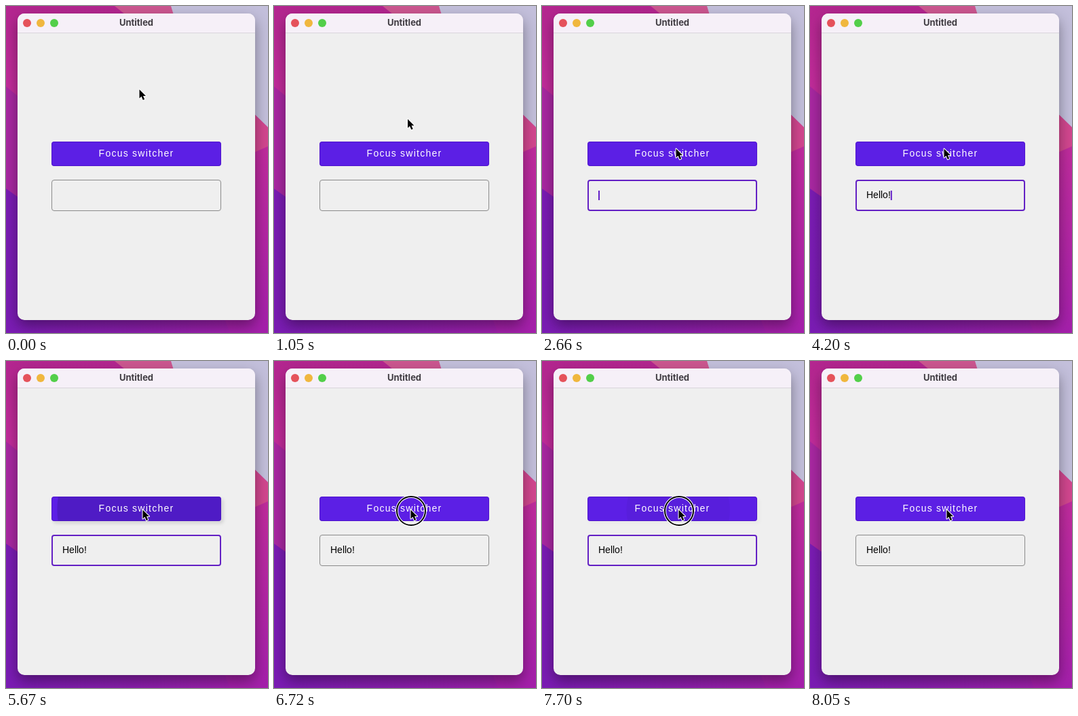
Write an HTML page that moves like this. It is 386x480 px and loops after 8.19 s.

```html
<!DOCTYPE html>
<html lang="en">
<head>
<meta charset="utf-8">
<title>Focus switcher</title>
<style>
  html, body { margin: 0; width: 100%; height: 100%; overflow: hidden; }
  svg { display: block; width: 386px; height: 480px; }
  text { font: 14px "Liberation Sans", Arial, sans-serif; white-space: pre; }
  #win { filter: drop-shadow(0 9px 10px rgba(0, 0, 0, .38)); }
</style>
</head>
<body>
<svg viewBox="0 0 386 480">
  <defs>
    <linearGradient id="left" x2="0" y2="1">
      <stop stop-color="#b3268f"/><stop offset=".25" stop-color="#c22c9b"/>
      <stop offset="1" stop-color="#9a22a8"/>
    </linearGradient>
    <linearGradient id="violet" x2="1" y2="0">
      <stop stop-color="#7a1cb4"/><stop offset=".5" stop-color="#8d1fae"/>
      <stop offset="1" stop-color="#a721ac"/>
    </linearGradient>
    <linearGradient id="right" x2="0" y2="1">
      <stop stop-color="#c62f99"/><stop offset="1" stop-color="#a420ab"/>
    </linearGradient>
    <clipPath id="face"><rect x="67" y="199" width="250" height="36" rx="4"/></clipPath>
    <filter id="soft" x="-10%" y="-50%" width="120%" height="200%"><feGaussianBlur stdDeviation="2"/></filter>
  </defs>

  <!-- wallpaper -->
  <rect width="386" height="480" fill="url(#left)"/>
  <path d="M0 268L386 400V480H0Z" fill="url(#violet)"/>
  <path d="M0 118L17 132V280L0 268Z" fill="#a928a2"/>
  <path d="M200 140H386V480H330Z" fill="url(#right)"/>
  <path d="M160 0H260V40H210Z" fill="#cc5790"/>
  <path d="M340 134L386 178V206L340 226Z" fill="#d2478f"/>
  <path d="M243 0H386V178L260 56Z" fill="#c3bfdb"/>

  <!-- window -->
  <g id="win">
    <rect x="17" y="11" width="350" height="450" rx="10" fill="#efefef"/>
    <path d="M17 40V21a10 10 0 0 1 10-10H357a10 10 0 0 1 10 10V40Z" fill="#f6f0f8"/>
  </g>
  <path d="M17 39.5H367" stroke="#dad5dc"/>
  <circle cx="31" cy="25" r="6" fill="#e5525b"/>
  <circle cx="51" cy="25" r="6" fill="#f0b73e"/>
  <circle cx="71" cy="25" r="6" fill="#53cf4a"/>
  <text x="192" y="29" text-anchor="middle" fill="#3f3b41"
        style="font: 700 13px Inter, sans-serif">Untitled</text>

  <!-- button -->
  <rect id="shade" x="69" y="202" width="252" height="37" rx="5" filter="url(#soft)"/>
  <g clip-path="url(#face)">
    <rect x="67" y="199" width="250" height="36" fill="#5c1fe5"/>
    <circle id="ripple"/>
  </g>
  <rect x="67.5" y="199.5" width="249" height="35" rx="3.5" fill="none" stroke="#4a12c4" stroke-opacity=".7"/>
  <text x="136.6" y="221" fill="#fff" letter-spacing="1.25">Focus switcher</text>

  <!-- text field -->
  <rect id="field" fill="none"/>
  <text id="typed" x="83" y="282"></text>
  <rect id="caret" y="271" width="2" height="14" fill="#6320c8"/>

  <g id="pointer">
    <g id="ring" fill="none">
      <circle cx=".5" cy="1.5" r="21" stroke="#fff" stroke-width="4"/>
      <circle cx=".5" cy="1.5" r="21" stroke="#000" stroke-width="2"/>
    </g>
    <path d="M0 0V13L3 10.3L5.3 15.6L7.7 14.6L5.5 9.5H9.5Z" stroke="#fff" stroke-width="2"
          stroke-linejoin="round" paint-order="stroke"/>
  </g>
</svg>
<script>
const LOOP = 8190, STEP = 70;
const $ = id => document.getElementById(id);
const set = (id, attrs) => {
  for (const k in attrs) $(id).setAttribute(k, attrs[k]);
};
const clamp = x => Math.min(1, Math.max(0, x));
const mix = (a, b, k) => a + (b - a) * k;
const smooth = x => x * x * (3 - 2 * x);
const show = (id, on) => set(id, { visibility: on ? "visible" : "hidden" });

// cubic-bezier(.4, 0, .2, 1)
function fastOutSlowIn(x) {
  let lo = 0, hi = 1, u = .5;
  for (let i = 0; i < 20; i++) {
    u = (lo + hi) / 2;
    const v = 1 - u;
    if (1.2 * v * v * u + .6 * v * u * u + u * u * u < x) lo = u; else hi = u;
  }
  return u * u * (3 - 2 * u);
}

// press time and delay until the ripple starts
const clicks = [[1470, 65], [5530, 30], [6720, 50], [7630, 50]];
const keys = [2800, 2870, 3080, 3220, 3290, 3360];
const caretOn = [[1680, 2100], [2590, 3710], [4200, 4690], [5180, 5670], [6930, 7350]];
const advance = [0, 10.1, 17.9, 21, 24.1, 31.9, 35.8];

function pointerAt(t) {
  const a = smooth(clamp((t - 840) / 420)), b = smooth(clamp((t - 4550) / 350));
  return [196.5 + a + 4 * b, 122.5 + 87 * a + 9 * b];
}

function drawRipple(t, start, [px, py]) {
  const age = t - start, k = clamp(age / 225);
  const alpha = clamp(age / 75) * clamp((375 - age) / 150);
  set("ripple", {
    cx: mix(px, 192, k), cy: mix(py, 217, k),
    r: mix(75, 136, fastOutSlowIn(k)),
    "fill-opacity": .14 * alpha
  });
}

function drawField(focus) {
  const w = mix(1, 2, focus), rgb = [[139, 99], [139, 32], [139, 196]].map(([a, b]) => Math.round(mix(a, b, focus)));
  set("field", {
    x: 67 + w / 2, y: 255 + w / 2, width: 250 - w, height: 46 - w, rx: 4 - w / 2,
    stroke: `rgb(${rgb})`, "stroke-width": w
  });
}

function draw(t) {
  const [x, y] = pointerAt(t);
  set("pointer", { transform: `translate(${x} ${y})` });

  const [press, delay] = clicks.filter(c => c[0] <= t).pop() || [-1e4, 0];
  const since = t - press;
  show("ring", since < 140);
  drawRipple(t, press + delay, [x, y]);
  const lift = clamp((since - 50) / 80) * clamp((340 - since) / 140);
  set("shade", { "fill-opacity": .1 * lift });

  // each click toggles the focus
  drawField(clicks.reduce((f, c, i) => f + (i % 2 ? -1 : 1) * clamp((t - c[0] - 180) / 150), 0));

  const n = keys.filter(k => k <= t).length;
  $("typed").textContent = "Hello!".slice(0, n);
  set("caret", { x: 83 + advance[n] });
  show("caret", caretOn.some(([a, b]) => t >= a && t < b));
}

const begin = performance.now();
function tick() {
  const t = (performance.now() - begin) % LOOP;
  draw(Math.floor(t / STEP) * STEP);
  requestAnimationFrame(tick);
}
tick();
</script>
</body>
</html>
```
